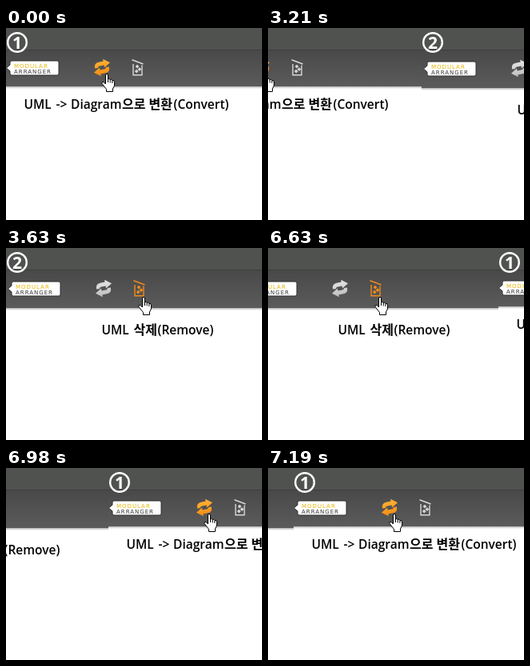
These frames come from a looping animation (320 px wide and 240 px high, 7.26 s). An HTML page:

```html
<!DOCTYPE html>
<html lang="ko">
<head>
<meta charset="utf-8">
<title>UML toolbar</title>
<style>
  html, body { margin: 0; width: 100%; height: 100%; overflow: hidden; background: #fff; }
  svg { display: block; width: 100vw; height: 100vh; }
  text { white-space: pre; }
  .label { font: 600 15.5px "Open Sans", "Noto Sans", sans-serif; fill: #000; }
  .label .ko { font: 700 16px "Noto Sans CJK KR", "Noto Sans CJK", sans-serif; }
  .badge { font: 7px "DejaVu Sans", sans-serif; letter-spacing: 1px; }
  .num { font: 700 21px "Open Sans", "Noto Sans", sans-serif; fill: #fff; text-anchor: middle; }
</style>
</head>
<body>
<svg id="stage" viewBox="0 0 320 240">
  <defs>
    <linearGradient id="bar" x2="0" y2="1">
      <stop stop-color="#494949"/><stop offset="1" stop-color="#5b5b5b"/>
    </linearGradient>
    <linearGradient id="shade" x2="0" y2="1">
      <stop stop-color="#b4b4b4"/><stop offset="1" stop-color="#fff"/>
    </linearGradient>
    <linearGradient id="orange" x2="0" y2="1">
      <stop stop-color="#ffb436"/><stop offset="1" stop-color="#f28a14"/>
    </linearGradient>
    <linearGradient id="silver" x2="0" y2="1">
      <stop stop-color="#e6e6e6"/><stop offset="1" stop-color="#bdbdbd"/>
    </linearGradient>
    <path id="swap" transform="rotate(-10 11 10.5)" d="M2 10Q2 3 8 3H14V0L22 6L14 11V8H9Q6 8 6 10Z
      M20 11Q20 18 14 18H8V21L0 15L8 10V13H13Q16 13 16 11Z"/>
    <g id="bin">
      <path d="M.5 1.2L14.5 6.4" fill="none" stroke="currentColor" stroke-width="1.6"/>
      <path d="M2 6.5V20.2H13V8" fill="none" stroke="currentColor" stroke-width="1.4"/>
      <path d="M7 7.2L9.4 9.6L7 12L4.6 9.6ZM10 10.7L12.4 13.1L10 15.5L7.6 13.1ZM6.2 13.2L8.6 15.6L6.2 18L3.8 15.6Z" fill="currentColor"/>
    </g>
    <path id="hand" d="M5.5 13V2Q5.5 .5 7 .5T8.5 2V7Q10 5.5 11.2 7.5Q13 6.5 13.9 8.5Q16.5 8 16.5 10.2V15L14.5 19V22.5H6.5V19.5L1 12.5Q.5 9.8 3 10.5Z
      M8.5 7V11M11.2 7.5V11.5M13.9 8.5V12" fill="#fff" stroke="#000" stroke-linejoin="round"/>
  </defs>
  <g id="convert"></g>
  <g id="remove"></g>
</svg>
<script>
const HOLD = 3000, STEP = 70, HALF = 3630, WIDTH = 320;
const [convert, remove] = ['convert', 'remove'].map(id => document.getElementById(id));

const word = (x, y, s, cls = '') => `<text x="${x}" y="${y}" class="${cls}">${s}</text>`;

function slide({ num, edge, dx, dy, swap, bin, hand, words, base }) {
  return `
    <rect width="320" height="240" fill="#fff"/>
    <rect width="320" height="28" fill="#505250"/>
    <rect y="27" width="320" height="1" fill="#3e3f3e"/>
    <rect y="28" width="320" height="${edge - 28}" fill="url(#bar)"/>
    <rect y="${edge}" width="320" height="3" fill="url(#shade)"/>
    <circle cx="14" cy="18" r="11.8" fill="none" stroke="#fff" stroke-width="2.4"/>
    ${word(14, 25.5, num, 'num')}
    <g transform="translate(${dx} ${dy})">
      <path d="M7 41H64Q66 41 66 43V57Q66 59 64 59H7Q5 59 5 57V54L.5 50L5 46V43Q5 41 7 41Z" fill="#fff" stroke="#2e2e2e"/>
      <g class="badge">
        <g fill="#e8b400">${word(10, 50, 'MODULAR')}</g>
        <g fill="#333">${word(10, 57, 'ARRANGER')}</g>
      </g>
      <use href="#swap" x="109" y="39" fill="url(#${swap})" transform="translate(0 0)"/>
      <use href="#bin" x="157" y="38.5" color="${bin}"/>
    </g>
    <use href="#hand" x="${hand[0]}" y="${hand[1]}"/>
    <g class="label">${words.map(([x, s, cls]) => word(x, base, s, cls)).join('')}</g>`;
}

convert.innerHTML = slide({
  num: 1, edge: 73, dx: 0, dy: 0, swap: 'orange', bin: '#d6d6d6', hand: [119, 57], base: 101,
  words: [[22.5, 'UML'], [62.5, '-&gt;'], [81, 'Diagram'], [145, '으로', 'ko'], [178.5, '변환', 'ko'], [209.5, '(Convert)']]
});
remove.innerHTML = slide({
  num: 2, edge: 75, dx: 2, dy: 1, swap: 'silver', bin: '#f08a1c', hand: [165, 61], base: 108,
  words: [[119.5, 'UML'], [159.5, '삭제', 'ko'], [189.5, '(Remove)']]
});

const place = (el, x) => el.setAttribute('transform', `translate(${x} 0)`);

// Each half rests, then pushes left by a tenth of the width per step.
function draw(ms) {
  const t = ms % (2 * HALF), k = t % HALF;
  const shift = k < HOLD ? 0 : WIDTH / 10 * (Math.floor((k - HOLD) / STEP) + 1);
  const [leaving, coming] = t < HALF ? [convert, remove] : [remove, convert];
  place(leaving, -shift);
  place(coming, WIDTH - shift);
}

const start = performance.now();
function tick() {
  draw(performance.now() - start);
  requestAnimationFrame(tick);
}
tick();
</script>
</body>
</html>
```
